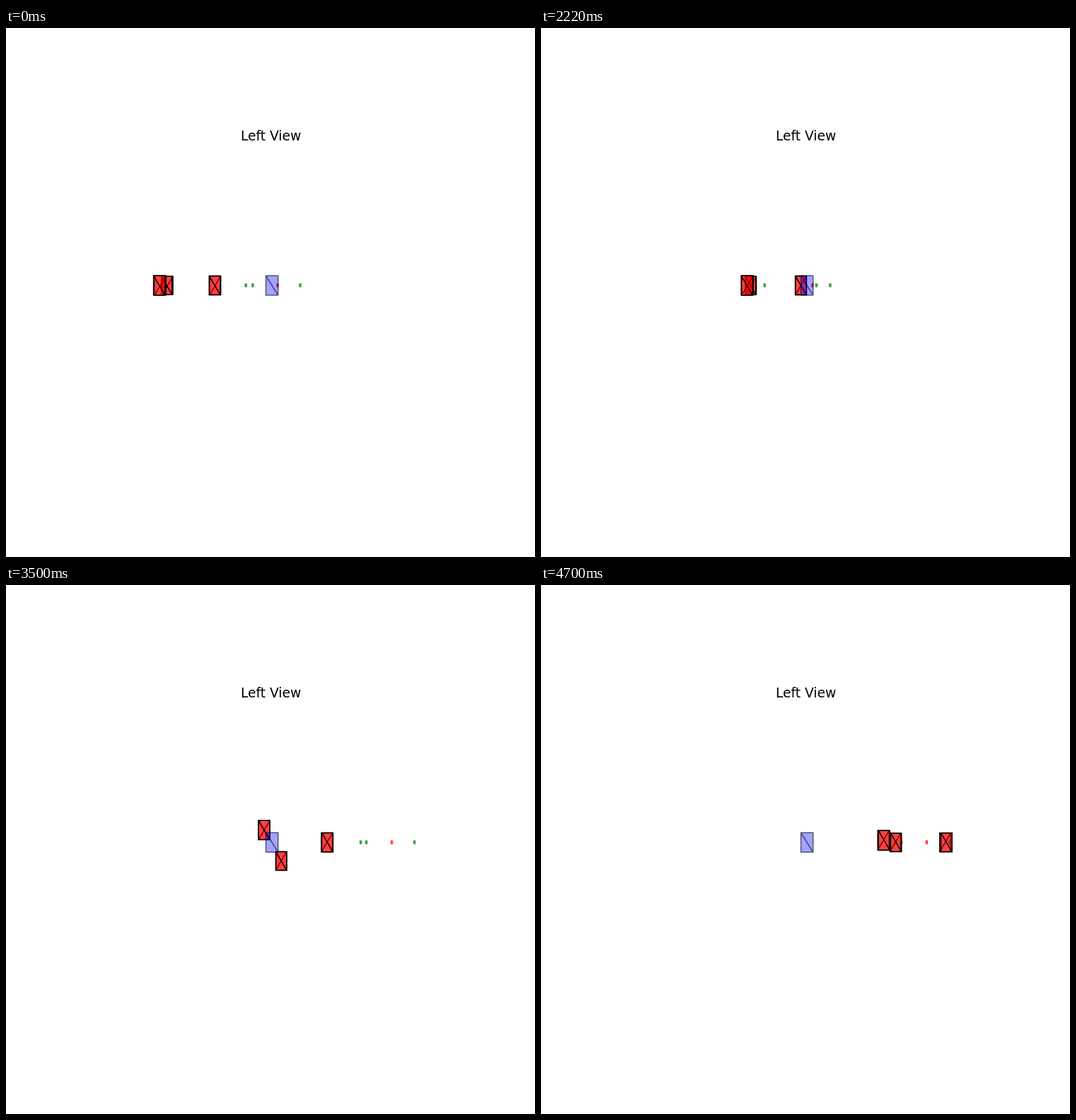
An HTML page for the animation above (6280 ms loop, 748 by 748 pixels).

```html
<!DOCTYPE html>
<html lang="en">
<head>
<meta charset="utf-8">
<title>Left View</title>
<style>
  html, body { margin: 0; width: 100%; height: 100%; overflow: hidden; background: #fff; }
  svg { display: block; width: 100%; height: 100%; }
  text { font: 18.667px "DejaVu Sans", sans-serif; }
  .drone { fill: rgba(255, 0, 0, .5); stroke: #000; stroke-width: 1.5; }
  .obstacle { fill: rgba(0, 0, 255, .36); stroke: rgba(0, 0, 30, .6); stroke-width: 1.5; }
</style>
</head>
<body>
<svg viewBox="0 0 748 748">
  <text x="374.6" y="159" text-anchor="middle">Left View</text>
  <g id="scene"></g>
  <path class="obstacle" d="M367.5 350.2H384.7V377.8H367.5ZL384.7 377.8"/>
</svg>
<script>
const LOOP = 6280, HOLD = 1580, STEP = 80, LAST = 40;
const CLIMB = 10, RETURN = 16, DEPART = 19;  // first step of each phase
const SPEED = 8, SIDE = 57, TURN = 4 * Math.PI / 180;
const BOX = { w: 15.7, h: 26.8, depth: 17 };
const EYE = { x: 374, y: 364 }, DEPTH = 0.00053, RISE = 2.12;

// World: x along the path, d towards the viewer, z up.
// Each marker sits "ahead" of the goal and to one side.
const team = [
  { ahead: -40, side: -1, start: { x: -153, d: -85, z: 0 } },
  { ahead: 32, side: 0, start: { x: -78.5, d: 0, z: 0 } },
  { ahead: -40, side: 1, start: { x: -152, d: SIDE, z: 0 } }
];

const scene = document.getElementById("scene");

function add(tag, attrs) {
  const el = document.createElementNS("http://www.w3.org/2000/svg", tag);
  for (const key in attrs) el.setAttribute(key, attrs[key]);
  return scene.appendChild(el);
}

function project({ x, d, z }) {
  const scale = 1 + d * DEPTH;
  return { x: EYE.x + x * scale, y: EYE.y - z * RISE * scale, scale };
}

const goalAt = step => ({ x: step < DEPART ? 10 : 171.5, d: 0, z: 0 });

function yawAt(step) {
  if (step < CLIMB) return TURN * (step + 1);
  if (step < DEPART) return TURN * (step - RETURN + CLIMB + 1);
  return TURN * Math.max(0, DEPART + 4 - step);
}

// The triangle yaws around the goal, and stands upright while climbing.
function markerAt(step, { ahead, side }) {
  const goal = goalAt(step).x, wing = side * SIDE;
  if (step >= CLIMB && step < RETURN) return { x: goal + ahead, d: 0, z: wing };
  const c = Math.cos(yawAt(step)), s = Math.sin(yawAt(step));
  return { x: goal + ahead * c - wing * s, d: ahead * s + wing * c, z: 0 };
}

function advance(p, to) {
  const dx = to.x - p.x, dd = to.d - p.d, dz = to.z - p.z;
  const k = Math.min(1, SPEED / (Math.hypot(dx, dd, dz) || 1));
  return { x: p.x + dx * k, d: p.d + dd * k, z: p.z + dz * k };
}

// Straight cruise first, then each drone chases its marker.
function fly(drone) {
  const path = [drone.start];
  for (let step = 0; step < LAST; step++) {
    const p = path[step];
    path.push(step < CLIMB ? { ...p, x: p.x + SPEED } : advance(p, markerAt(step, drone)));
  }
  return path;
}

// One box side with a single diagonal.
function face(pos, offset, rising) {
  const { x, y, scale } = project({ ...pos, d: pos.d + offset });
  const w = BOX.w * scale / 2, h = BOX.h * scale / 2;
  const l = x - w, r = x + w, t = y - h, b = y + h;
  const line = rising ? `M${l} ${b}L${r} ${t}` : `M${l} ${t}L${r} ${b}`;
  return `M${l} ${t}H${r}V${b}H${l}Z${line}`;
}

const addDot = color => add("rect", { width: 3.5, height: 5.4, fill: color, "fill-opacity": .75 });

function placeDot(dot, pos) {
  const p = project(pos);
  dot.setAttribute("x", p.x - 1.75);
  dot.setAttribute("y", p.y - 2.9);
}

for (const drone of team) drone.marker = addDot("green");
const goalDot = addDot("red");
for (const drone of team) {
  drone.path = fly(drone);
  drone.back = add("path", { class: "drone" });
  drone.front = add("path", { class: "drone" });
}

function draw(time) {
  const t = time % LOOP;
  const step = t < HOLD ? 0 : Math.min(LAST, 1 + Math.floor((t - HOLD) / STEP));
  placeDot(goalDot, goalAt(step));
  for (const drone of team) {
    const pos = drone.path[step];
    placeDot(drone.marker, markerAt(step, drone));
    drone.back.setAttribute("d", face(pos, -BOX.depth / 2, true));
    drone.front.setAttribute("d", face(pos, BOX.depth / 2, false));
  }
}

const start = performance.now();
function tick() {
  draw(performance.now() - start);
  requestAnimationFrame(tick);
}
tick();
</script>
</body>
</html>
```
